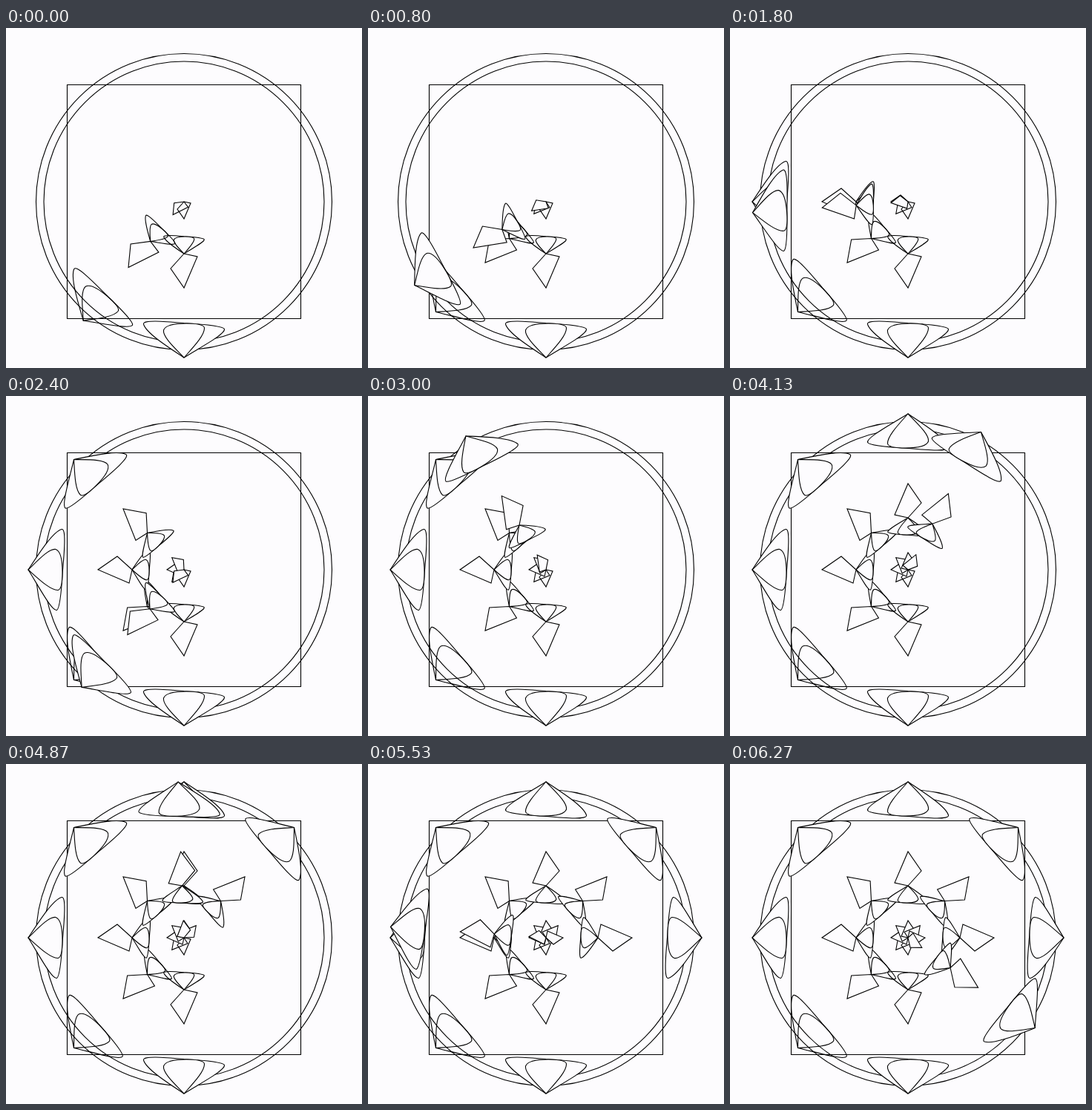
These frames come from a looping animation (480 by 458 pixels, 6340 ms). An HTML page:

```html
<!DOCTYPE html>
<html lang="en">
<head>
<meta charset="utf-8">
<title>Rotating rosette</title>
<style>
  html, body { margin: 0; width: 100%; height: 100%; overflow: hidden; background: #fdfcfe; }
  svg { display: block; width: 480px; height: 458px; }
  svg * { vector-effect: non-scaling-stroke; }
</style>
</head>
<body>
<svg viewBox="0 0 480 458" fill="none" stroke="#000" stroke-width="1.1">
  <defs>
    <g id="petal">
      <path d="M0 210C-22 195.5 -51 177 -54.5 165C-56 159 -28 161 0 163.5C26 165 52 167 54.5 171.5C56 178 25 194.5 0 210Z"/>
      <path d="M0 210C-12 197.5 -29 182 -27.5 173C-25 166 -10 164 3 164C15 164 27 165 27.5 170C28 180 12 196.5 0 210Z"/>
    </g>
    <path id="kite" d="M0 70L18 74L0 116L-18 90Z"/>
    <g id="arm">
      <use href="#petal"/>
      <use href="#petal" transform="translate(0 -35) scale(.5)"/>
      <use href="#kite"/>
      <use href="#kite" transform="translate(0 -35) scale(.5)"/>
    </g>
  </defs>
  <g id="stage" transform="translate(240 234)">
    <rect x="-157.5" y="-157.5" width="315" height="315"/>
    <circle r="199.5"/>
    <circle r="189"/>
  </g>
</svg>
<script>
const LOOP = 6340, FRAMES = 95, STEP = 1000 / 15, COPIES = 7;
const stage = document.getElementById('stage');

function addArm(fill) {
  const arm = document.createElementNS('http://www.w3.org/2000/svg', 'use');
  arm.setAttribute('href', '#arm');
  arm.setAttribute('fill', fill);
  return stage.appendChild(arm);
}

addArm('#fdfcfe');
// Turns begin about a second apart, drifting slightly later; the first is already under way.
const arms = Array.from({ length: COPIES }, (_, i) => ({
  node: addArm(i ? '#fdfcfe' : 'none'),
  start: i ? 160 + 1000 * (i - 1) + 3 * (i - 1) ** 2 : -905,
  target: 45 * (i + 1)
}));

// Constant speed, then a gentle stop.
function progress(ms) {
  const s = ms / 1000;
  if (s < 0.82) return s;
  const tail = Math.min(s - 0.82, 0.36);
  return 0.82 + tail - tail * tail / 0.72;
}

function render(time) {
  for (const { node, start, target } of arms) {
    const age = time - start;
    node.setAttribute('display', age > 0 ? 'inline' : 'none');
    node.setAttribute('transform', `rotate(${target * progress(Math.max(age, 0))})`);
  }
}

const origin = performance.now();
function tick() {
  const time = (performance.now() - origin) % LOOP;
  render(Math.min(Math.floor((time + 5) / STEP), FRAMES - 1) * STEP);
  requestAnimationFrame(tick);
}
tick();
</script>
</body>
</html>
```
